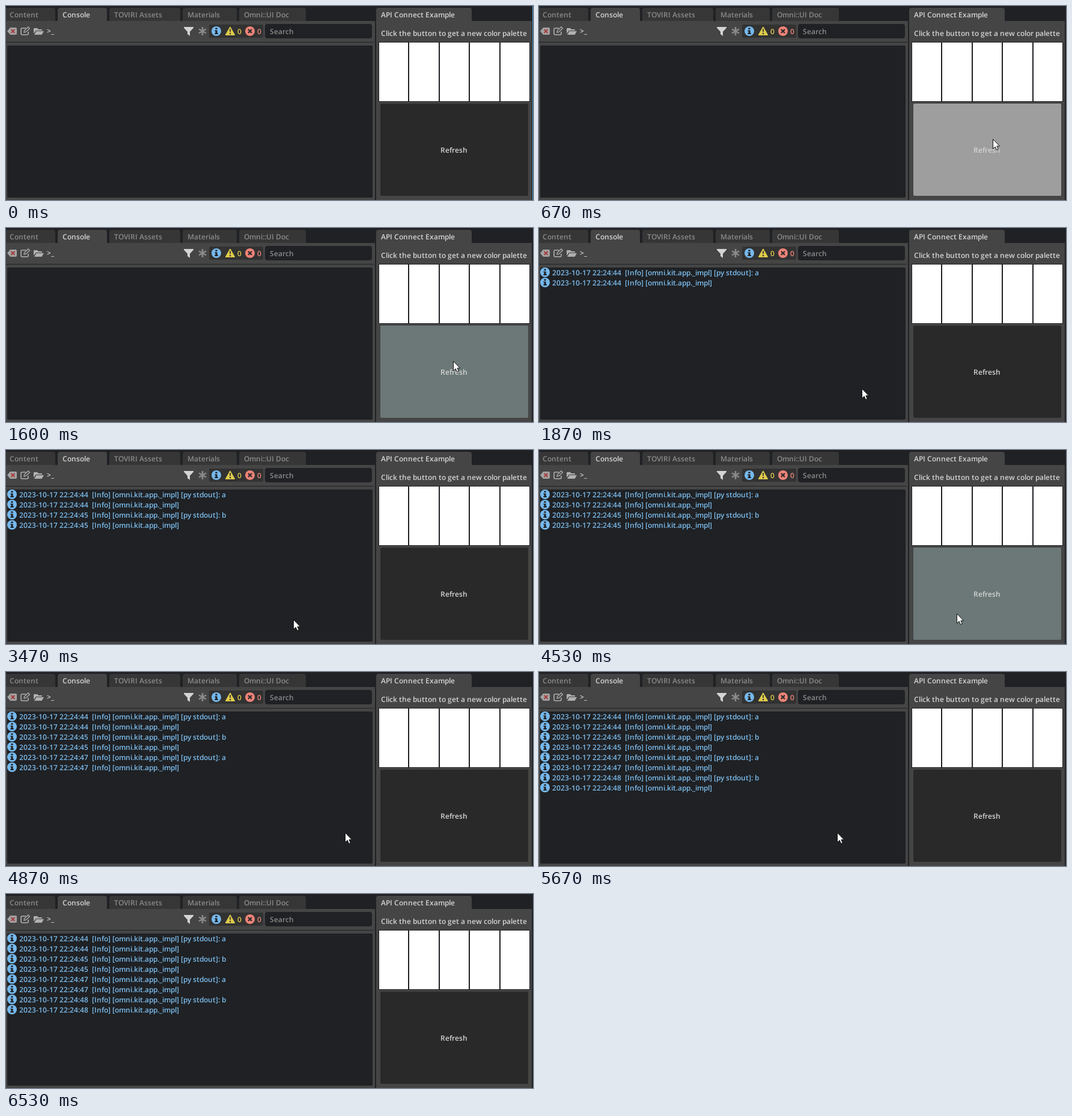
These frames come from a looping animation (877 by 324 pixels, 6940 ms). An HTML page:

```html
<!DOCTYPE html>
<html lang="en">
<head>
<meta charset="utf-8">
<title>API Connect Example</title>
<style>
html, body { margin: 0; width: 100%; height: 100%; overflow: hidden; background: #1f2124; }
svg { display: block; }
text { font: 600 12px "Open Sans", sans-serif; fill: #d4d4d4; white-space: pre; text-rendering: geometricPrecision; }
.panel { fill: #454545; }
.dark { fill: #1f2124; }
.tab { fill: #363636; }
.dim { fill: #8a8a8a; }
.log text { fill: #7cbcec; }
</style>
</head>
<body>
<svg width="877" height="324" viewBox="0 0 877 324">
  <defs>
    <g id="info">
      <circle r="8" fill="#76b9ed"/>
      <path d="M-1.6-5.6h3.2v2.7h-3.2zM-2.6-1.6h4.2v4.7h1.2v1.9h-5.4v-1.9h1.2v-2.8h-1.2z" fill="#1f2124"/>
    </g>
  </defs>

  <rect class="dark" width="877" height="324"/>
  <path class="panel" d="M0 25H614V324H0zM616 25H875V324H616z"/>
  <g id="tabs"></g>

  <!-- toolbar -->
  <path d="M2 42l5-6h9q2 0 2 2v8q0 2-2 2H7z" fill="#a3a3a3"/>
  <path d="M8.5 39l6 6m0-6l-6 6" stroke="#a63c3c" stroke-width="2"/>
  <g fill="none" stroke="#b0b0b0" stroke-width="1.6">
    <path d="M33 37H27q-2 0-2 2v7q0 2 2 2h8q2 0 2-2v-3"/>
    <path d="M30 44l.6-3L37 35l2.4 2.4-6.4 6z" stroke-width="1.3"/>
  </g>
  <path d="M46 46V38q0-1 1-1h5l2 2h5q1 0 1 1v1H50zM47 48l3.5-6H63l-3.5 6z" fill="#b0b0b0"/>
  <text x="68" y="46">&gt;_</text>
  <path d="M296 35h16v1.5l-6 6.5v7l-4-3v-4l-6-6.5z" fill="#d4d4d4"/>
  <path d="M327 35v14M321 38.5l12 7M321 45.5l12-7" stroke="#8a8a8a" stroke-width="2.6"/>
  <rect x="338" y="31" width="90" height="22" rx="2" fill="#323232"/>
  <use href="#info" x="350" y="42"/>
  <path d="M373 35.5l7.2 12.7h-14.4z" fill="#dfcb4a" stroke="#dfcb4a" stroke-width="1.6" stroke-linejoin="round"/>
  <path d="M372 38.5h2.2l-.4 5h-1.4zM372 45h2.2v2.2H372z" fill="#323232"/>
  <text x="385" y="47" style="fill:#dfcb4a">0</text>
  <circle cx="406" cy="42" r="8" fill="#ee8378"/>
  <path d="M403 39l6 6m0-6l-6 6" stroke="#2b2b2b" stroke-width="2.4"/>
  <text x="418" y="47" style="fill:#ee8378">0</text>
  <rect class="dark" x="431" y="30" width="178" height="24" rx="4"/>
  <text class="dim" x="439" y="47">Search</text>
  <rect class="dark" y="60" width="612" height="1"/>

  <rect class="dark" x="2" y="66" width="608" height="254" rx="2"/>
  <g id="log" class="log"></g>

  <!-- palette window -->
  <text x="624" y="50">Click the button to get a new color palette</text>
  <rect class="dark" x="620" y="60" width="252" height="100"/>
  <g id="palette" fill="#fff" shape-rendering="crispEdges"></g>
  <rect id="button" x="623" y="163" width="246" height="154" rx="2"/>
  <text x="723" y="245">Refresh</text>
  <rect id="edge" x="876" width="1" height="324" fill="#4c9fd3"/>
  <path id="cursor" d="M.5.5V16.5L4.2 13l2.5 5.5 2.6-1.1L6.9 12h4.6z" fill="#fff" stroke="#111"/>
</svg>
<script>
const LOOP = 6940;
const el = id => document.getElementById(id);

function add(parent, tag, attrs, content = '') {
  const node = document.createElementNS('http://www.w3.org/2000/svg', tag);
  for (const name in attrs) node.setAttribute(name, attrs[name]);
  node.textContent = content;
  return parent.appendChild(node);
}

function addTab(label, left, right, textX, active) {
  add(el('tabs'), 'path', {
    class: active ? 'panel' : 'tab',
    d: `M${left} 25V7q0-4 4-4H${right - 4}q4 0 4 4V25z`
  });
  add(el('tabs'), 'text', { x: textX, y: 19, class: active ? '' : 'dim' }, label);
}
addTab('Content', -4, 82, 6);
addTab('Console', 86, 168, 94, true);
addTab('TOVIRI Assets', 172, 290, 180);
addTab('Materials', 294, 384, 302);
addTab('Omni::UI Doc', 388, 499, 396);
addTab('API Connect Example', 616, 775, 624, true);

for (let i = 0; i < 5; i++)
  add(el('palette'), 'rect', { x: 621 + i * 50.4, y: 61, width: 48.4, height: 98 });

// Each log entry prints two lines at its tick.
const entries = [[25, 44, 'a'], [40, 45, 'b'], [70, 47, 'a'], [85, 48, 'b']].map(([tick, second, value], i) => {
  const group = add(el('log'), 'g', {});
  [` [py stdout]: ${value}`, ''].forEach((tail, row) => {
    const y = 74 + 17 * (2 * i + row);
    add(group, 'use', { href: '#info', x: 10, y });
    add(group, 'text', { x: 22, y: y + 5 }, `2023-10-17 22:24:${second}  [Info] [omni.kit.app._impl]${tail}`);
  });
  return { tick, group };
});

// The interface sets its type on whole pixels: every glyph advance is rounded.
const pen = document.createElement('canvas').getContext('2d');
pen.font = '600 12px "Open Sans", sans-serif';
pen.textRendering = 'geometricPrecision';
for (const text of document.querySelectorAll('text')) {
  let x = +text.getAttribute('x');
  const starts = [...text.textContent].map(char => {
    const left = x;
    x += Math.round(pen.measureText(char).width);
    return left;
  });
  text.setAttribute('x', starts.join(' '));
}

const linear = u => u;
const easeIn = u => u * u;
const easeOut = u => 1 - (1 - u) ** 2;
const smooth = u => u * u * (3 - 2 * u);
const hold = u => u < 1 ? 0 : 1;

// Cursor keys: tick, x, y, easing used to get there.
const keys = [
  [5, 880, 208, hold], [12, 744, 223, easeOut], [19, 744, 222, hold],
  [24, 744, 222, hold], [28, 537, 268, linear], [33, 477, 284, easeOut],
  [36, 477, 283, hold], [38, 477, 282, hold], [52, 478, 283, hold],
  [58, 695, 273, smooth], [69, 695, 273, hold], [73, 564, 268, linear],
  [76, 496, 268, easeOut], [93, 496, 268, hold], [97, 178, 314, easeIn],
  [98, 150, 340, hold]
];

function cursorAt(tick) {
  const next = keys.findIndex(key => key[0] > tick);
  if (next < 1) return next ? keys.at(-1).slice(1, 3) : keys[0].slice(1, 3);
  const [t0, x0, y0] = keys[next - 1], [t1, x1, y1, ease] = keys[next];
  const u = ease((tick - t0) / (t1 - t0));
  return [Math.round(x0 + (x1 - x0) * u), Math.round(y0 + (y1 - y0) * u)];
}

// The screen refreshes 15 times a second, on times rounded to 10 ms.
function tickAt(ms) {
  const tick = Math.round(ms * 0.015);
  return Math.round(tick * 100 / 15) * 10 > ms ? tick - 1 : tick;
}

function draw(ms) {
  const tick = tickAt(ms);
  const [x, y] = cursorAt(tick);
  const hovered = x >= 623 && x < 869 && y >= 163 && y < 317;
  const pressed = tick === 24 || tick === 68 || tick === 69;
  el('cursor').setAttribute('transform', `translate(${x} ${y})`);
  el('button').setAttribute('fill', pressed ? '#6b7877' : hovered ? '#9e9e9e' : '#292929');
  el('edge').setAttribute('visibility', tick < 6 ? 'visible' : 'hidden');
  for (const { tick: start, group } of entries)
    group.setAttribute('visibility', tick >= start ? 'visible' : 'hidden');
}

const start = performance.now();
function loop() {
  draw((performance.now() - start) % LOOP);
  requestAnimationFrame(loop);
}
loop();
</script>
</body>
</html>
```
